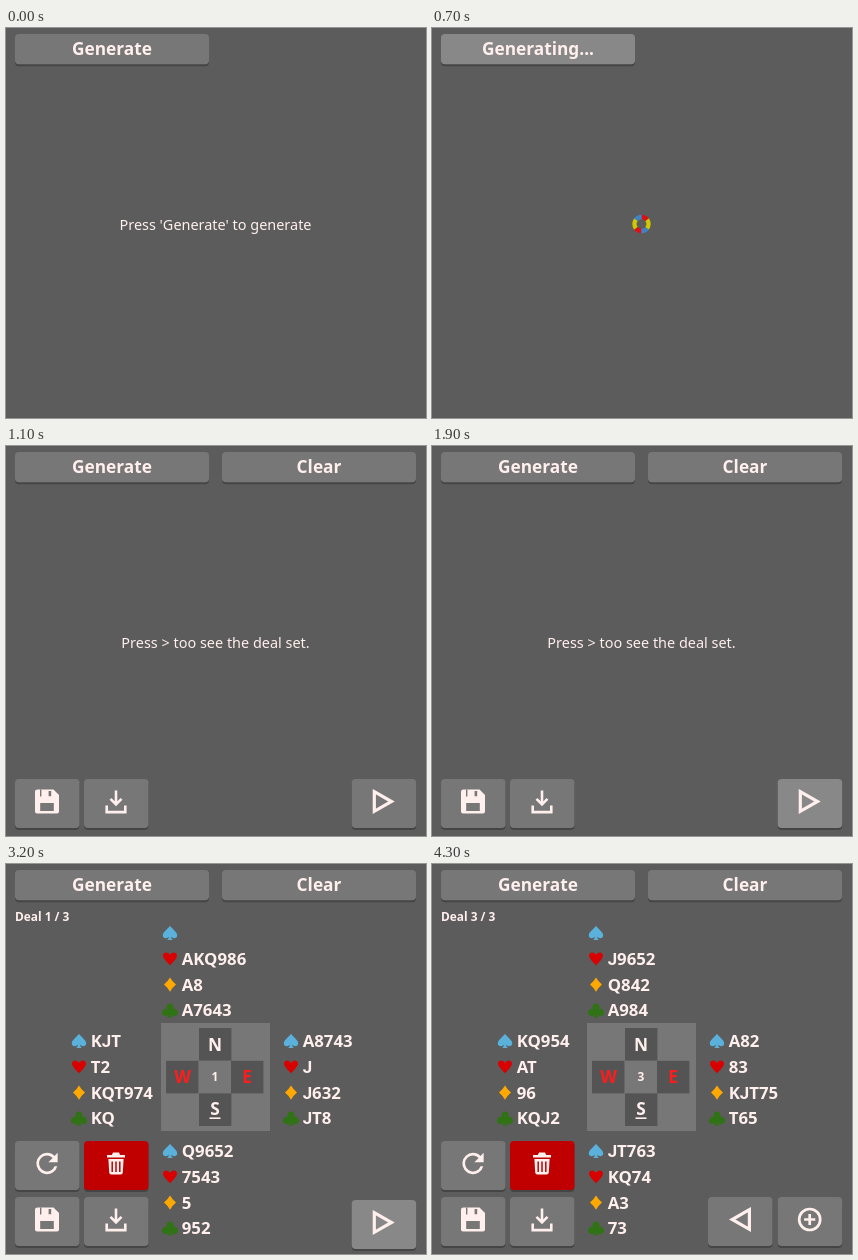
Recreate the animation shown at these times as an HTML page. Size 420x390 px, loop 7300 ms.

```html
<!DOCTYPE html>
<html lang="en">
<head>
<meta charset="utf-8">
<title>Deal generator</title>
<style>
  html, body { margin: 0; width: 100%; height: 100%; overflow: hidden; background: #5c5c5c; }
  svg { display: block; width: 420px; height: 390px; }
  text { font-family: "Noto Sans", "Open Sans", sans-serif; fill: #ffefed; }
  .bold { font-weight: 700; font-size: 16.8px; }
  .label { font-weight: 700; font-size: 17.3px; text-anchor: middle; }
  .note { font-size: 14.45px; text-anchor: middle; }
  .small { font-weight: 700; font-size: 11.9px; }
  .mid { text-anchor: middle; }
  .j { font-family: Roboto, Inter, sans-serif; }
  .line { fill: none; stroke: #ffefed; }
</style>
</head>
<body>
<svg id="stage" viewBox="0 0 420 390"></svg>
<script>
const LOOP = 7300;
const INK = '#ffefed', FACE = '#777', HOVER = '#888', SHADE = '#454545';
const stage = document.getElementById('stage');

// Hands are listed north, west, east, south; suits from spades to clubs.
const deals = [
  ['/AKQ986/A8/A7643', 'KJT/T2/KQT974/KQ', 'A8743/J/J632/JT8', 'Q9652/7543/5/952'],
  ['/AT853/A654/T763', '95/KJ9/QJ972/AQ2', 'KJT832/62/T83/K8', 'AQ764/Q74/K/J954'],
  ['/J9652/Q842/A984', 'KQ954/AT/96/KQJ2', 'A82/83/KJT75/T65', 'JT763/KQ74/A3/73']
];
const seats = [[164, 69], [73, 177], [285, 177], [164, 287]];

const suits = [
  ['#5ab2dc', 'M0-7.2C2-4 7.2-1 7.2 2.4C7.2 5.6 3 6 1 3.6Q1.2 6 3 7H-3Q-1.2 6-1 3.6C-3 6-7.2 5.6-7.2 2.4C-7.2-1-2-4 0-7.2Z'],
  ['#d90000', 'M0 6.6C-2 4-7-.2-7-3C-7-7-1.6-7.6 0-3.8C1.6-7.6 7-7 7-3C7-.2 2 4 0 6.6Z'],
  ['#ffa800', 'M0-7.2Q2.6-2.8 6 0Q2.6 2.8 0 7.2Q-2.6 2.8-6 0Q-2.6-2.8 0-7.2Z'],
  ['#2f7314', 'M0-7A3.6 3.6 0 0 1 2.8-1.2A3.6 3.6 0 1 1 1 3.4Q1.2 6 3 7H-3Q-1.2 6-1 3.4A3.6 3.6 0 1 1-2.8-1.2A3.6 3.6 0 0 1 0-7Z']
];

// Icons are centred on the origin; cut-outs use the button's face colour.
const icons = {
  save: face => `<path fill="${INK}" d="M-9.5-12H6.5L12-6.5V10Q12 12 10 12H-10Q-12 12-12 10V-10Q-12-12-9.5-12Z"/>
    <path fill="${face}" d="M-6.8 1.4H6.8V9.4H-6.8ZM1.6-10.6H4.2V-5.2H1.6ZM-7-12H-5.6V-5H-7Z"/>`,
  load: () => `<path class="line" stroke-width="2.6" d="M0-11V2M-5.5-2.6L0 3L5.5-2.6M-9.3 4V10.6H9.3V4"/>`,
  redo: () => `<path fill="${INK}" transform="scale(1.33) translate(-12 -12)"
    d="M17.65 6.35A7.96 7.96 0 0 0 12 4a8 8 0 1 0 7.73 10h-2.08A6 6 0 1 1 12 6c1.66 0 3.14.69 4.22 1.78L13 11h7V4z"/>`,
  bin: face => `<path fill="${INK}" d="M-9-8.6H-4.2L-3-11H3L4.2-8.6H9V-6H-9ZM-7.6-4.6H7.6L6.8 9Q6.6 11 4.6 11H-4.6Q-6.6 11-6.8 9Z"/>
    <path stroke="${face}" stroke-width="1.5" d="M-3.8-2V8.4M0-2V8.4M3.8-2V8.4"/>`,
  next: () => `<path class="line" stroke-width="3.2" d="M-9.4-9.8L7.8 0L-9.4 9.8Z"/>`,
  prev: () => `<path class="line" stroke-width="3.2" d="M9.4-9.8L-7.8 0L9.4 9.8Z"/>`,
  plus: () => `<circle class="line" stroke-width="2.7" r="10.5"/><path class="line" stroke-width="2.7" d="M-5.6 0H5.6M0-5.6V5.6"/>`
};

const text = (x, y, cls, str, extra = '') =>
  `<text x="${x}" y="${y}" class="${cls}" ${extra}>${str}</text>`;

function box(x, y, w, h, face, pressed, inside) {
  return `<g transform="translate(${x} ${y + (pressed ? 3 : 0)})">
    <rect y="2" width="${w}" height="${h}" rx="4" fill="${SHADE}"/>
    <rect width="${w}" height="${h}" rx="4" fill="${face}"/>${inside}</g>`;
}

const wide = (x, label, face = FACE, pressed = false) =>
  box(x, 6, 194, 30.3, face, pressed, text(97, 20.8, 'label', label));

const tile = (x, y, icon, face = FACE, pressed = false) =>
  box(x, y, 64.5, 49, face, pressed,
    `<g transform="translate(32 22.5)">${icons[icon](face)}</g>`);

function hand(cards, [x, y]) {
  return cards.split('/').map((held, i) => {
    const row = y + i * 25.8;
    const [color, shape] = suits[i];
    return `<path fill="${color}" transform="translate(${x} ${row})" d="${shape}"/>` +
      text(x + 11.7, row + 6, 'bold', held.replace(/J/g, '<tspan class="j">J</tspan>'));
  }).join('');
}

function compass(n) {
  const cell = (x, y) => `<rect x="${x}" y="${y}" width="32.4" height="32.6" fill="#545454"/>`;
  const red = 'style="fill:#ff1c1c"';
  return `<rect x="155" y="159" width="109" height="108" fill="${FACE}"/>` +
    cell(193, 164) + cell(160, 196.8) + cell(225, 196.8) + cell(193, 229.4) +
    text(209, 187, 'label', 'N') + text(176.5, 219, 'label', 'W', red) +
    text(241, 219, 'label', 'E', red) + text(209, 251, 'label', 'S') +
    `<rect x="203.5" y="253.4" width="11" height="1.6" fill="${INK}"/>` +
    text(209, 217, 'small mid', n);
}

function spinner(turn) {
  const arcs = [['#d0c800', -38, 76], ['#e01010', -88, 50], ['#3f83c4', 38, 54]];
  const ring = arcs.map(([color, from, span]) => [0, 180].map(flip =>
    `<circle r="7" fill="none" stroke="${color}" stroke-width="4.4" pathLength="360"
      stroke-dasharray="${span} 360" transform="rotate(${from + flip})"/>`).join('')).join('');
  return `<g transform="translate(209.5 196) rotate(${turn})">${ring}</g>`;
}

function intro(t) {
  if (t < 700) {
    return wide(9, 'Generate', t < 500 ? FACE : HOVER, t >= 600) +
      text(209.5, 202, 'note', "Press 'Generate' to generate");
  }
  const step = Math.floor((t - 700) / 100);
  return wide(9, 'Generating...', t < 1000 ? HOVER : FACE) + spinner(step * 45);
}

function table(t) {
  const deal = t < 2200 ? 0 : t < 3300 ? 1 : t < 4200 ? 2 : 3;
  const pressed = [2100, 3200, 4100].some(at => t >= at && t < at + 100);
  const face = t >= 1900 && t < 4300 ? HOVER : FACE;
  let out = wide(9, 'Generate') + wide(216, 'Clear') +
    tile(9, 333, 'save') + tile(78, 333, 'load') +
    tile(345.7, 333, deal === 3 ? 'plus' : 'next', face, pressed);
  if (!deal) return out + text(209.5, 202, 'note', 'Press &gt; too see the deal set.');
  out += text(9, 57, 'small', `Deal ${deal} / 3`) + compass(deal) +
    tile(9, 277, 'redo') + tile(78, 277, 'bin', '#c00000') +
    deals[deal - 1].map((cards, i) => hand(cards, seats[i])).join('');
  return deal > 1 ? out + tile(276, 333, 'prev') : out;
}

let shown = -1;
function draw(now) {
  const t = Math.max(0, now) % LOOP;
  const step = Math.floor(t / 100);
  if (step !== shown) {
    shown = step;
    stage.innerHTML = '<rect width="420" height="390" fill="#5c5c5c"/>' +
      (t < 1100 ? intro(t) : table(t));
  }
}

const start = performance.now();
function tick() {
  draw(performance.now() - start);
  requestAnimationFrame(tick);
}
tick();
</script>
</body>
</html>
```
